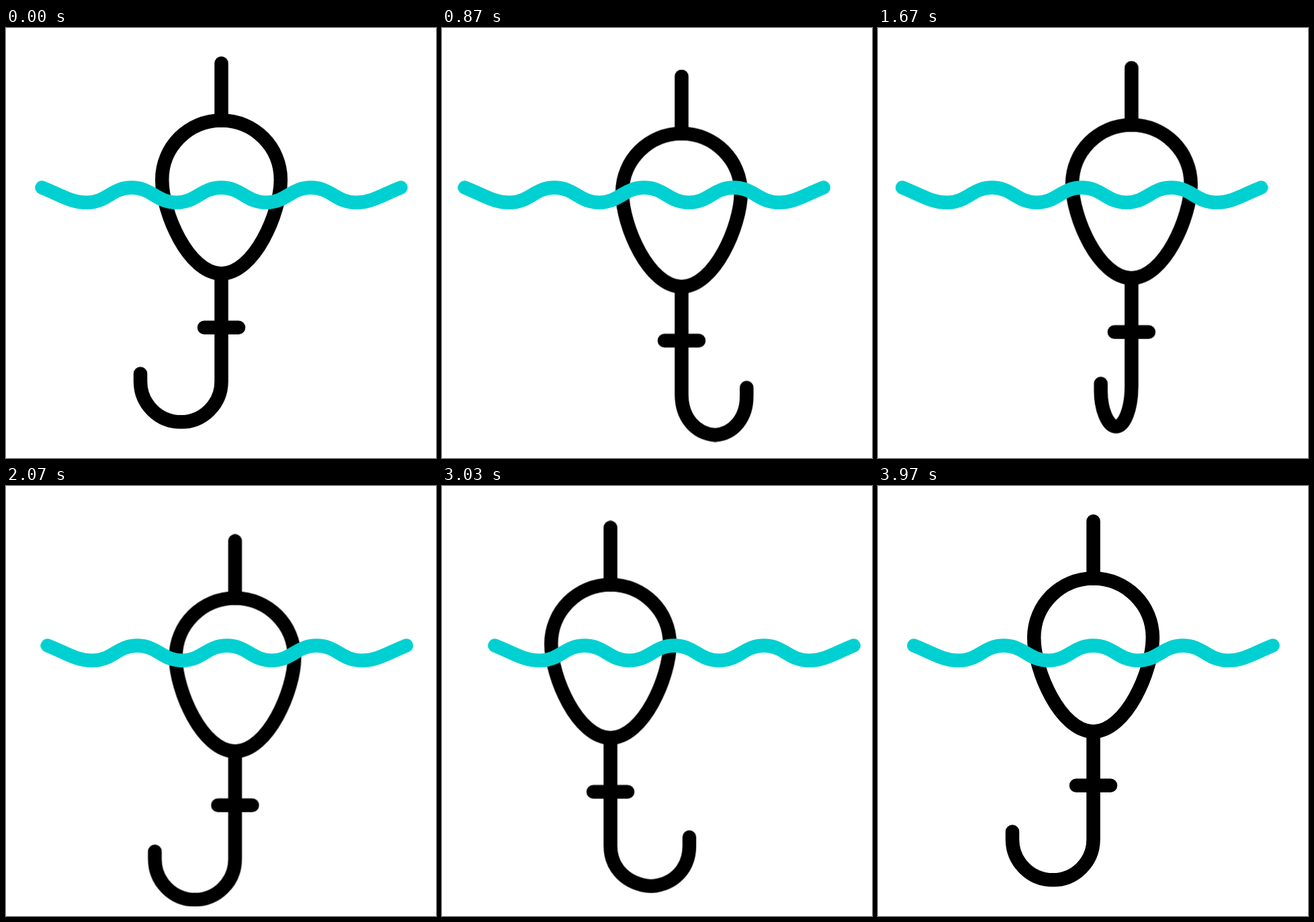
Recreate the animation shown at these times as an HTML page without scripts. Size 640 px wide and 640 px high, loop 4000 ms.

```html
<!DOCTYPE html>
<html lang="en">
<head>
<meta charset="utf-8">
<title>Fishing float</title>
<style>
  html, body { margin: 0; width: 100%; height: 100%; overflow: hidden; background: #fff; }
  svg { display: block; width: 100%; height: 100%; }

  path { fill: none; stroke: #000; stroke-width: 20.5; stroke-linecap: round; stroke-linejoin: round; }
  .wave { stroke: #00d0d1; }

  .drift, .bob, .hook, .wave {
    animation: 4s cubic-bezier(.333, 0, .667, 1) infinite;
  }
  .drift { animation-name: drift; }
  .bob { animation-name: bob; }
  .hook { animation-name: turn; }
  .wave { animation-name: sway; }

  @keyframes drift {
    0%, 99.17%, 100% { transform: translateX(0); }
    38.33% { transform: translateX(60px); }
    75% { transform: translateX(-70px); }
  }

  @keyframes bob {
    0%, 99.17%, 100% { transform: translateY(0); }
    16.67%, 83.33% { transform: translateY(30.5px); }
    33.33%, 66.67% { transform: translateY(-18.5px); }
    50% { transform: translateY(31px); }
  }

  @keyframes sway {
    0%, 99.17%, 100% { transform: translateX(0); }
    33.33% { transform: translateX(-27.3px); }
    65.83% { transform: translateX(32px); }
  }

  /* hook: left, edge-on, right, edge-on, left */
  @keyframes turn {
    0%, 50.83%, 99.17%, 100% {
      d: path("M200 514.5 L200 526 C200 559.3 227 586.3 260.3 586.3 C293.5 586.3 320.5 559.3 320.5 526 L320.5 365.5");
    }
    15%, 35.25%, 67.5%, 82.5% {
      d: path("M320.5 527.4 L320.5 538 C320.5 562 320.5 586.3 320.5 586.3 C320.5 586.3 320.5 559.3 320.5 526 L320.5 365.5");
    }
    24.5%, 75% {
      d: path("M441.5 512.7 L441.5 526 C441.5 560 418 583.5 383 586.3 C346 583.5 320.5 560 320.5 526 L320.5 365.5");
    }
  }
</style>
</head>
<body>
<svg viewBox="0 0 640 640">
  <g class="drift">
    <g class="bob">
      <path d="M320.5 52.5V137.5"/>
      <path d="M320.5 137.5C369.3 137.5 408.8 177 408.8 225.8S369.3 365.5 320.5 365.5S232.2 274.6 232.2 225.8S271.7 137.5 320.5 137.5Z"/>
      <path d="M295 445.7H346"/>
      <path class="hook" d="M200 514.5 L200 526 C200 559.3 227 586.3 260.3 586.3 C293.5 586.3 320.5 559.3 320.5 526 L320.5 365.5"/>
    </g>
  </g>
  <path class="wave" d="M53.5 237.5C79 247.5 96 259.7 120.3 259.7c30 0 37-22.1 66.7-22.1s37 22.1 66.7 22.1s37-22.1 66.8-22.1s37 22.1 66.7 22.1s37-22.1 66.7-22.1s37 22.1 66.8 22.1C545 259.7 562 247.5 587.5 237.5"/>
</svg>
</body>
</html>
```
